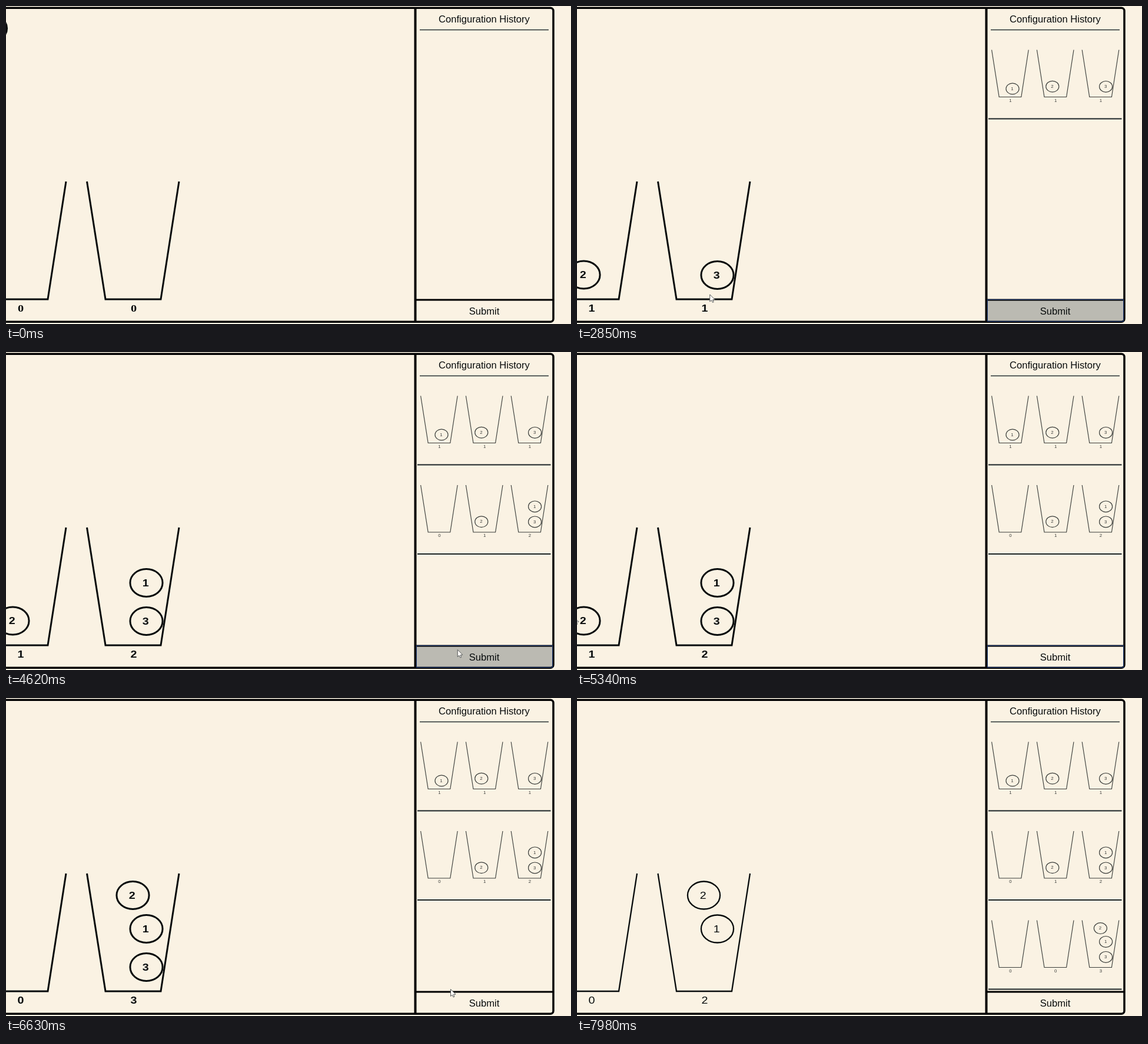
Write an HTML page with a canvas that moves like this. It is 960 px wide and 540 px high and loops after 8000 ms.

```html
<!DOCTYPE html>
<html lang="en">
<head>
<meta charset="utf-8">
<title>Configuration History</title>
<style>
  html, body { margin: 0; width: 100%; height: 100%; overflow: hidden; background: #faf2e3; }
  canvas { display: block; }
</style>
</head>
<body>
<canvas id="stage" width="960" height="540"></canvas>
<script>
const ctx = document.getElementById('stage').getContext('2d');
const LOOP = 8000, SETUP = 90;
const PAPER = '#faf2e3', INK = '#070b0c';
const ASPECT = 1.19, RADIUS = 23.5;   // the playfield is drawn wider than tall
const BIN_PITCH = 192, LAST_BIN = 217;
const MINI = 0.4, ROW_PITCH = 151.5;
const BUTTON = { x: 800, y: 508 };

// Each drag carries a ball to a spot, rising by `lift` midway; `grip` is the pointer's offset.
const DRAGS = [
  { ball: 1, bin: 0, start: 270, end: 700, x: -158, y: 466 },
  { ball: 2, bin: 1, start: 1230, end: 1680, x: 11.5, y: 456.5 },
  { ball: 3, bin: 2, start: 2010, end: 2340, x: 238.5, y: 457, grip: { x: 25, y: 12 } },
  { ball: 1, bin: 2, start: 3300, end: 4020, x: 238.5, y: 392, lift: 200 },
  { ball: 2, bin: 2, start: 5400, end: 6330, x: 215.5, y: 335, lift: 130, grip: { x: -18, y: -7 } },
  { ball: 3, bin: 0, start: 7170, end: 7980, x: -158, y: 446 }
];
const CLICKS = [2640, 4560, 6900];

const mix = (a, b, k) => a + (b - a) * k;
const easeInOut = k => k * k * k * (k * (6 * k - 15) + 10);
const easeOut = k => 1 - (1 - k) ** 3;
const hump = k => Math.sin(Math.PI * k) ** 2;
const add = (p, q) => ({ x: p.x + q.x, y: p.y + q.y });
const gripOf = drag => drag.grip || { x: 2, y: 12 };

function ballAt(ball, t) {
  let spot = { x: -226 + 68 * ball, y: 38 };
  for (const drag of DRAGS) {
    if (drag.ball !== ball || t < drag.start) continue;
    const k = Math.min(1, (t - drag.start) / (drag.end - drag.start));
    const e = easeInOut(k);
    spot = {
      x: mix(spot.x, drag.x, e),
      y: mix(spot.y, drag.y, e) - (drag.lift || 0) * hump(k)
    };
  }
  return spot;
}

function countIn(bin, t) {
  const placed = {};
  for (const drag of DRAGS) if (t >= drag.end) placed[drag.ball] = drag.bin;
  return Object.values(placed).filter(b => b === bin).length;
}

const STOPS = [
  ...DRAGS.flatMap(drag => [drag.start, drag.end].map(time =>
    ({ time, ...add(ballAt(drag.ball, time), gripOf(drag)) }))),
  ...CLICKS.flatMap(click => [click - 50, click + 50].map(time => ({ time, ...BUTTON })))
].sort((a, b) => a.time - b.time);

function pointerAt(t) {
  const held = DRAGS.find(drag => t >= drag.start && t < drag.end);
  if (held) return add(ballAt(held.ball, t), gripOf(held));
  const next = STOPS.findIndex(stop => stop.time > t);
  if (next < 0) return STOPS[STOPS.length - 1];
  if (next === 0) return STOPS[0];
  const from = STOPS[next - 1], to = STOPS[next];
  const k = easeOut((t - from.time) / (to.time - from.time));
  return { x: mix(from.x, to.x, k), y: mix(from.y, to.y, k) };
}

// Redraws pile up and thicken the ink, except during a drag and just after it.
const isThin = t => DRAGS.some(drag => t >= drag.start && t < drag.end + 200);

const isFocused = t => CLICKS.some(click =>
  t >= click && t < DRAGS.find(drag => drag.start > click).start);

const isHovered = t => [0, 60, 120, 180].some(delay => {
  const { x, y } = pointerAt(t - delay);
  return x > 697 && y > 499;
});

function path(points, close) {
  ctx.beginPath();
  points.forEach(([x, y]) => ctx.lineTo(x, y));
  if (close) ctx.closePath();
}

function line(x0, y0, x1, y1, width, color = '#000') {
  ctx.strokeStyle = color;
  ctx.lineWidth = width;
  path([[x0, y0], [x1, y1]]);
  ctx.stroke();
}

function digit(text, x, y, font) {
  ctx.save();
  ctx.translate(x, y);
  ctx.scale(ASPECT, 1);
  ctx.font = font;
  ctx.fillText(text, 0, 0);
  ctx.restore();
}

function playfield(t, { width, color, bold = false, rise = 0 }) {
  const early = t < SETUP;
  const font = (bold ? 'bold ' : '') + '16.5px "Liberation Sans", Arial, sans-serif';
  const countFont = early ? 'bold 17px "Liberation Serif", serif' : font;
  ctx.strokeStyle = ctx.fillStyle = color;
  ctx.lineWidth = width;
  for (let bin = 0; bin < 3; bin++) {
    const c = LAST_BIN - BIN_PITCH * (2 - bin);
    path([[c - 79.5, 298], [c - 48, 498], [c + 46, 498], [c + 77, 298]]);
    ctx.stroke();
    digit(countIn(bin, t), c, 518.5, countFont);
  }
  for (let ball = 1; ball <= 3; ball++) {
    const { x, y } = add(ballAt(ball, t), { x: early ? -4 : 0, y: -rise });
    ctx.beginPath();
    ctx.ellipse(x, y, RADIUS * ASPECT - 0.4, RADIUS, 0, 0, Math.PI * 2);
    ctx.stroke();
    digit(ball, x - 1.2, y + 5.5, font);
  }
}

function historyRow(t, index) {
  const top = 74.5 + index * ROW_PITCH;
  ctx.save();
  ctx.translate(858 - 137 * MINI, top - 298 * MINI);
  ctx.scale(MINI, MINI);
  playfield(t, { width: 2.9, color: '#3b3e3b', rise: 3 });
  ctx.restore();
  line(699, top + 117, 925.5, top + 117, 1.8, '#1b2426');
}

// Narrowest installed face at the largest size that suits the side panel.
const headingFont = (() => {
  const faces = ['Noto Sans', 'Open Sans', 'Roboto', 'Liberation Sans'].map(name => {
    const font = size => `500 extra-condensed ${size}px "${name}", sans-serif`;
    ctx.font = font(20);
    return { font, width: ctx.measureText('Configuration History').width };
  });
  const best = faces.reduce((a, b) => (b.width < a.width ? b : a));
  return best.font(Math.min(21, 20 * 155 / best.width));
})();

function heading(text, y) {
  ctx.font = headingFont;
  ctx.fillStyle = INK;
  ctx.fillText(text, 812.5, y);
}

function panel(t) {
  line(703, 40.5, 922, 40.5, 1.5, '#253033');
  heading('Configuration History', 27.5);
  CLICKS.forEach((click, i) => { if (t >= click) historyRow(click, i); });

  if (isHovered(t)) {
    ctx.fillStyle = '#bbbab2';
    ctx.fillRect(697, 500, 232, 35);
  }
  heading('Submit', 524);

  line(695.5, 3, 695.5, 536, 4);
  line(695, 499, 930, 499, 3);
  ctx.lineWidth = 3.5;
  ctx.strokeStyle = '#000';
  ctx.beginPath();
  ctx.roundRect(-20, 3.3, 950, 533, 5);
  ctx.stroke();
  if (isFocused(t)) {
    ctx.strokeStyle = '#23407c';
    ctx.lineWidth = 1;
    ctx.strokeRect(697.5, 498.5, 231, 37);
  }
}

function pointer(t) {
  const { x, y } = pointerAt(t);
  ctx.save();
  ctx.translate(x, y);
  path([[0.5, 0], [0.5, 12], [3.2, 9.6], [5.2, 13.5], [7, 12.6], [5.3, 9], [9, 8.6]], true);
  ctx.fillStyle = '#fffdf8';
  ctx.strokeStyle = '#55585a';
  ctx.lineWidth = 1;
  ctx.fill();
  ctx.stroke();
  ctx.restore();
}

function draw(t) {
  ctx.fillStyle = PAPER;
  ctx.fillRect(0, 0, 960, 540);
  ctx.textAlign = 'center';
  const bold = !isThin(t);
  playfield(t, { width: bold ? 3 : 2.3, color: INK, bold });
  panel(t);
  pointer(t);
}

function tick(now) {
  draw(now % LOOP);
  requestAnimationFrame(tick);
}
draw(0);
requestAnimationFrame(tick);
</script>
</body>
</html>
```
